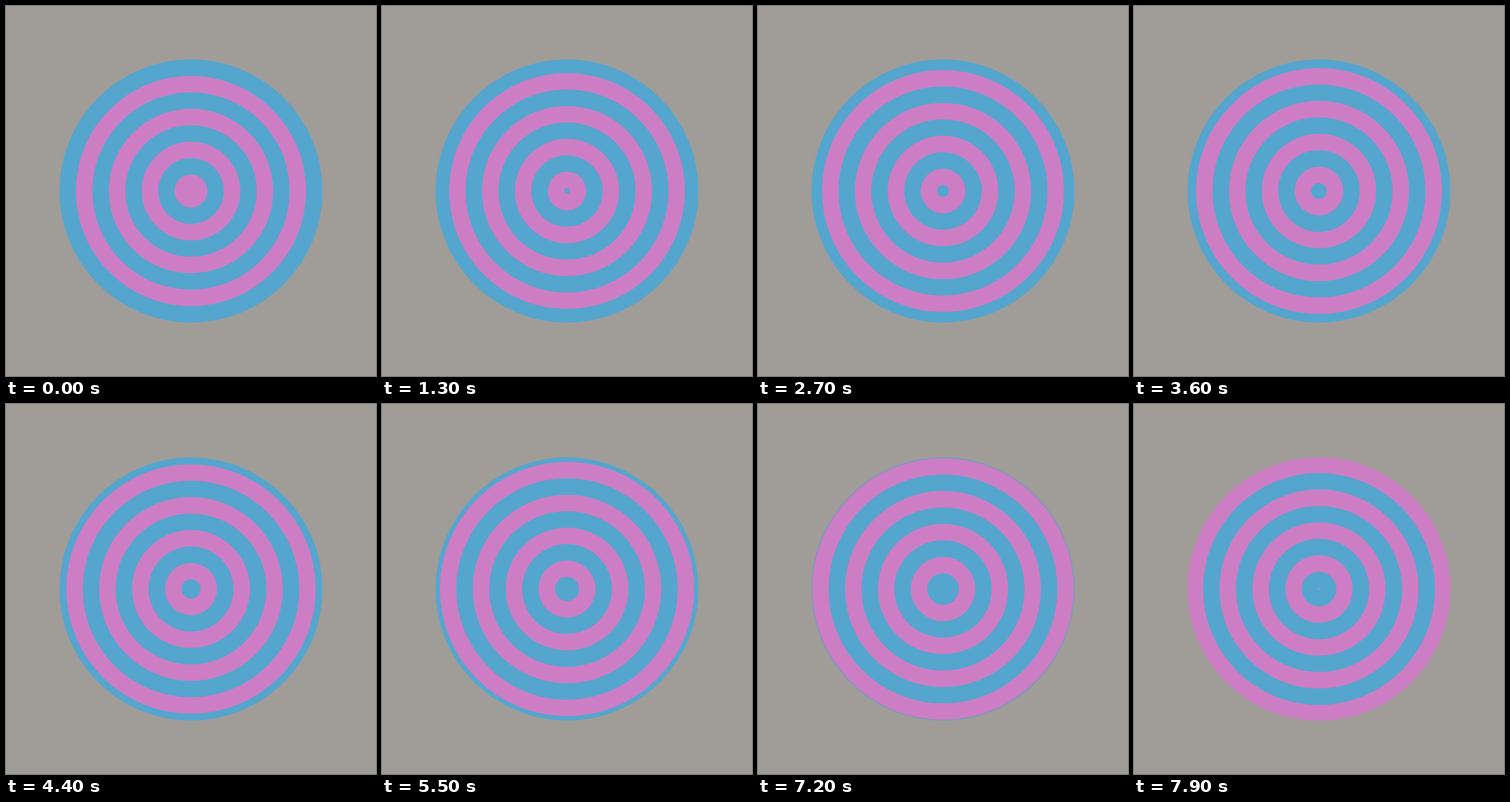
Recreate the animation shown at these times as an HTML page with a canvas. Size 480 by 480 pixels, loop 8 s.

```html
<!DOCTYPE html>
<html lang="en">
<head>
<meta charset="utf-8">
<title>Expanding rings</title>
<style>
  html, body { margin: 0; width: 100%; height: 100%; overflow: hidden; background: #a09c98; }
  canvas { display: block; width: 480px; height: 480px; }
</style>
</head>
<body>
<canvas id="stage" width="480" height="480"></canvas>
<script>
  const LOOP = 8000, STEP = 100;
  const RINGS = 8, RADIUS = 512 / 3, BAND = RADIUS / RINGS;
  const BAND_TIME = 7500; // ms for a ring to grow by one band
  const BACK = '#a09c98', COLORS = ['#cd7dc3', '#55a6ce'];
  const ctx = document.getElementById('stage').getContext('2d');

  function disc(radius, color) {
    ctx.fillStyle = color;
    ctx.beginPath();
    ctx.arc(240, 240, radius, 0, Math.PI * 2);
    ctx.fill();
  }

  function draw(time) {
    const shift = time / BAND_TIME;
    ctx.fillStyle = BACK;
    ctx.fillRect(0, 0, 480, 480);
    // The ring that crosses the rim is cut off there; new rings start at the centre.
    for (let i = RINGS - Math.floor(shift); i > -shift; i--) {
      const radius = Math.min((i + shift) * BAND, RADIUS);
      disc(radius, COLORS[Math.abs(i + 1) % 2]);
    }
  }

  const start = performance.now();
  function tick() {
    const time = (performance.now() - start) % LOOP;
    draw(Math.floor(time / STEP) * STEP);
    requestAnimationFrame(tick);
  }
  tick();
</script>
</body>
</html>
```
